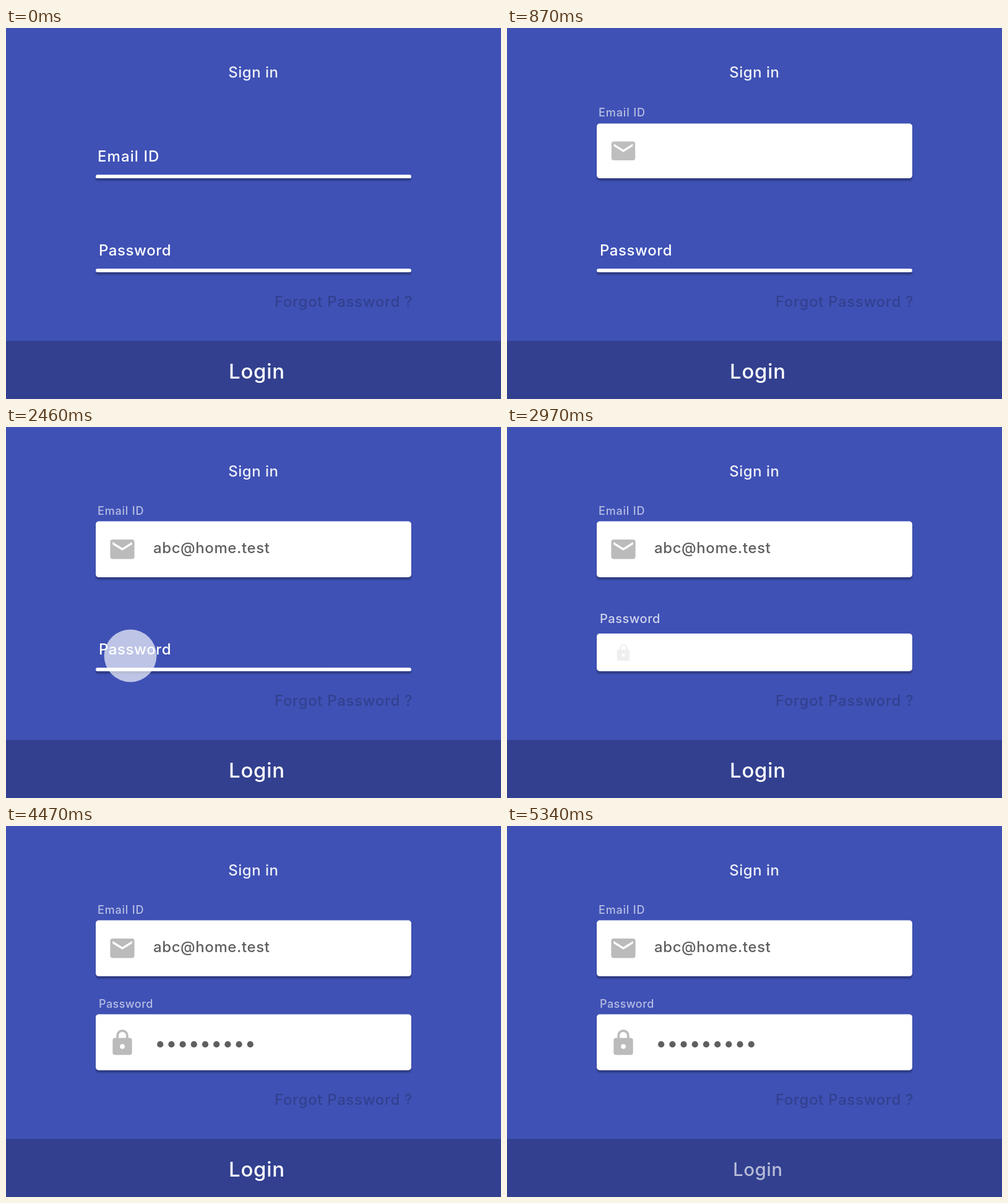
Write an HTML page that moves like this. It is 800 by 600 pixels and loops after 5.37 s.

```html
<!DOCTYPE html>
<html lang="en">
<head>
<meta charset="utf-8">
<title>Sign in</title>
<style>
  html, body { margin: 0; width: 100%; height: 100%; overflow: hidden; background: #3f51b5; }
  svg { display: block; width: 100vw; height: 100vh; }
  text { font-family: Inter, "Open Sans", sans-serif; font-weight: 500; white-space: pre; }
  .box { fill: #fff; filter: drop-shadow(0.5px 4.8px 1.3px rgba(44, 55, 125, 0.85)); }
  .icon { fill: #bbb; stroke: none; }
</style>
</head>
<body>
<svg id="stage" viewBox="0 0 800 600"></svg>
<script>
const LOOP = 5370, STEP = 30;
const stage = document.getElementById('stage');

function add(tag, attrs, parent = stage) {
  const node = document.createElementNS('http://www.w3.org/2000/svg', tag);
  set(node, attrs);
  parent.append(node);
  return node;
}
function set(node, attrs) {
  for (const key in attrs) node.setAttribute(key, attrs[key]);
}
function label(string, x, y, size, spacing, fill = '#fff') {
  const node = add('text', { x, y, fill, 'font-size': size, 'letter-spacing': spacing * size });
  node.textContent = string;
  return node;
}

const clamp = v => Math.min(1, Math.max(0, v));
const mix = (a, b, p) => a + (b - a) * p;

// Cubic Bezier easing, solved for x by bisection.
function ease(u) {
  if (u <= 0 || u >= 1) return clamp(u);
  const curve = (s, a, b) => 3 * (1 - s) ** 2 * s * a + 3 * (1 - s) * s * s * b + s ** 3;
  let low = 0, high = 1;
  for (let i = 0; i < 24; i++) {
    const mid = (low + high) / 2;
    if (curve(mid, 0.28, 0.105) < u) low = mid; else high = mid;
  }
  return curve(low, 0.06, 1);
}

function mailIcon(parent) {
  add('rect', { x: 2, y: 4, width: 20, height: 16, rx: 2 }, parent);
  add('path', { d: 'M4 6l8 5 8-5v2l-8 5-8-5z', fill: '#fff' }, parent);
}
function lockIcon(parent) {
  add('rect', { x: 4, y: 8, width: 16, height: 14, rx: 2 }, parent);
  add('path', { d: 'M8 8.5V6a4 4 0 0 1 8 0v2.5', fill: 'none', stroke: '#bbb', 'stroke-width': 1.9 }, parent);
  add('circle', { cx: 12, cy: 15, r: 2, fill: '#fff' }, parent);
}

function makeField({ name, x, bottom, spacing, start, blink, iconMiddle, drawIcon }) {
  const box = add('rect', { x: 145, width: 510, class: 'box' });
  const title = label(name, 0, 0, 24, spacing);
  const icon = add('g', { class: 'icon' });
  drawIcon(icon);
  const cursor = add('rect', { x: 229, y: bottom - 61, width: 2, height: 34, fill: '#5f5f5f' });

  return t => {
    const p = ease((t - start) / 540);
    const lift = ease((t - start) / 500);
    const height = mix(5.8, 90.6, p);
    set(box, { y: bottom - height, height, rx: Math.min(5, height / 2) });
    set(title, {
      transform: `translate(${x} ${bottom - mix(27, 101, lift)}) scale(${mix(1, 0.75, p)})`,
      opacity: mix(1, 0.62, p)
    });
    set(icon, {
      transform: `translate(188 ${bottom - height / 2}) scale(${1.96 * p}) translate(-12 ${-iconMiddle})`,
      opacity: clamp((p - 0.55) / 0.45)
    });
    const phase = clamp((t - blink.from) / (blink.to - blink.from));
    set(cursor, { opacity: Math.sin(Math.PI * phase) });
  };
}

add('rect', { width: 800, height: 600, fill: '#3f51b5' });
add('rect', { y: 506, width: 800, height: 94, fill: '#32408f' });
label('Sign in', 359.3, 80, 24, 0.02, '#eceef8');
label('Forgot Password ?', 434, 451, 24, 0.028, '#32408f');
const login = label('Login', 360, 567.3, 33, 0.022);

const fields = [
  makeField({
    name: 'Email ID', x: 148, bottom: 243.1, spacing: 0.045, start: 450,
    blink: { from: 990, to: 1320 }, iconMiddle: 12, drawIcon: mailIcon
  }),
  makeField({
    name: 'Password', x: 150, bottom: 395, spacing: 0.024, start: 2790,
    blink: { from: 3330, to: 3750 }, iconMiddle: 11.5, drawIcon: lockIcon
  })
];

const address = 'abc@home.test';
const typed = label('', 238, 204, 24, 0.025, '#5f5f5f');
const dots = Array.from({ length: 9 }, (_, i) =>
  add('circle', { cx: 249.2 + 18.2 * i, cy: 353.2, r: 5.1, fill: '#5f5f5f' }));

const taps = [
  { start: 120, cx: 195, cy: 218 },
  { start: 2370, cx: 201, cy: 370 },
  { start: 4800, cx: 405, cy: 555 }
];
const ripple = add('circle', { fill: '#fff' });

function drawRipple(t) {
  const tap = taps.find(({ start }) => t > start && t < start + 240);
  if (!tap) return set(ripple, { r: 0 });
  const u = (t - tap.start) / 240;
  set(ripple, { cx: tap.cx, cy: tap.cy, r: 65 * (1 - (1 - u) ** 2.25), opacity: 1 - u ** 1.1 });
}

function draw(t) {
  fields.forEach(update => update(t));
  const count = Math.floor((t - 1350) / 70) + 1;
  typed.textContent = address.slice(0, Math.max(0, count));
  dots.forEach((dot, i) => set(dot, { opacity: t >= 3870 + (i - 1) * 600 / 7 ? 1 : 0 }));
  drawRipple(t);

  const press = clamp((t - 5220) / 120);
  set(login, {
    transform: `translate(406 555) scale(${mix(1, 0.885, press)}) translate(-406 -555)`,
    opacity: mix(1, 0.65, press)
  });
}

const origin = performance.now();
function tick() {
  const t = (performance.now() - origin) % LOOP;
  draw(Math.floor(t / STEP) * STEP);
  requestAnimationFrame(tick);
}
tick();
</script>
</body>
</html>
```
